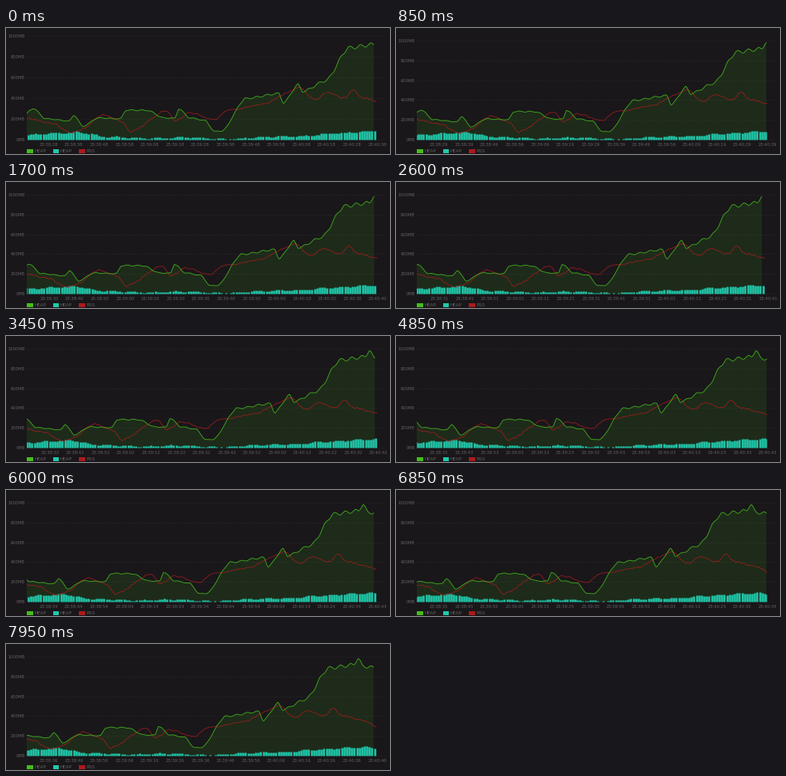
These frames come from a looping animation (480 by 158 pixels, 8 s). A matplotlib script:

```python
import numpy as np
import matplotlib.pyplot as plt
from matplotlib.animation import FuncAnimation
from matplotlib.collections import LineCollection
from matplotlib.patches import Polygon, Rectangle

W, H, DPI = 480, 158, 100
FRAMES, STEP = 160, 50
PX = 72 / DPI
SPEED = 3.16               # pixels per second, one sample per second
LEFT, RIGHT, BASE, END = 26, 463.5, 140, 459.5
BG, DIM = "#19171a", "#626063"
GREEN, TEAL, RED = "#45bd1c", "#20c9ac", "#ac1a1c"

# Turning points: position along the strip, megabytes
HEAP = [(20, 215), (34, 303), (49, 203), (79, 180), (85, 237), (96, 128),
        (115, 210), (143, 202), (150, 285), (177, 283), (197, 210), (211, 207),
        (216, 300), (229, 212), (249, 185), (260, 82), (270, 82), (299, 396),
        (341, 445), (347, 355), (365, 530), (371, 465), (400, 570), (428, 885),
        (459, 918), (465, 985), (471, 906), (492, 880)]
RSS = [(20, 215), (60, 150), (80, 65), (93, 90), (121, 238), (145, 176),
       (156, 74), (200, 280), (211, 180), (231, 262), (260, 190), (277, 285),
       (318, 335), (367, 500), (387, 380), (401, 455), (425, 396), (433, 486),
       (445, 405), (476, 342), (492, 268)]
BARS = [(20, 45), (60, 64), (90, 75), (125, 30), (180, 14), (222, 24),
        (275, 8), (335, 33), (375, 38), (405, 62), (475, 90), (492, 66)]


def ease_through(points, u):
    """Join the points with a blend of straight and smoothstep segments."""
    x, y = np.array(points, float).T
    i = np.clip(np.searchsorted(x, u, side="right") - 1, 0, len(x) - 2)
    k = np.clip((u - x[i]) / (x[i + 1] - x[i]), 0, 1)
    k = 0.35 * k + 0.65 * k * k * (3 - 2 * k)
    return y[i] + (y[i + 1] - y[i]) * k


def ripple(u, crest, period):
    return np.cos(2 * np.pi * (u - crest) / period)


rng = np.random.default_rng(4)
fine = np.arange(20, 495, 0.5)
samples = END + SPEED * np.arange(-142, 12)
heap = ease_through(HEAP, fine) * (1 + 0.018 * ripple(fine, 365, 13))
rss = ease_through(RSS, samples) + rng.uniform(-9, 9, samples.size)
load = ease_through(BARS, samples) + 6 * ripple(samples, 215, 26)
load = np.maximum(load + rng.uniform(-2, 2, samples.size), 2)

fig = plt.figure(figsize=(W / DPI, H / DPI), dpi=DPI, facecolor=BG)
ax = fig.add_axes([0, 0, 1, 1])
ax.set_xlim(0, W)
ax.set_ylim(H, 0)
ax.axis("off")

plot_area = Rectangle((LEFT, 0), RIGHT - LEFT, BASE + 0.5, transform=ax.transData)


def label(x, y, text, size=5.3, ha="center"):
    return ax.text(x, y, text, color=DIM, fontsize=size * PX, ha=ha,
                   va="center_baseline", family="DejaVu Sans")


def clipped(artist):
    artist.set_clip_path(plot_area)
    return artist


def curve(color, width, z):
    return clipped(ax.plot([], [], color=color, lw=width * PX, alpha=0.82, zorder=z)[0])


grid, y_labels = [], []
for mb in range(0, 1001, 200):
    grid.append(ax.plot([LEFT, 475], [0, 0], color="#2b292c", lw=0.8 * PX,
                        ls=(0, (1.5, 2)), zorder=1)[0])
    y_labels.append(label(23.5, 0, f"{mb}MB", 5.1, "right"))
x_labels = [label(0, 146, "") for _ in range(14)]

area = clipped(ax.add_patch(Polygon([(0, 0), (1, 0), (1, 1)], fc=GREEN, ec="none",
                                    alpha=0.12, zorder=2)))
bars = clipped(ax.add_collection(LineCollection([], colors=TEAL, linewidths=2.6 * PX,
                                                capstyle="butt", zorder=3)))
rss_line = curve(RED, 0.9, 4)
heap_line = curve(GREEN, 0.95, 5)

for x, name, color in ((26, "HEAP", GREEN), (58.5, "HEAP", TEAL), (91, "RSS", RED)):
    ax.add_patch(Rectangle((x, 151.5), 7.5, 5.5, fc=color, ec="none"))
    label(x + 9.3, 154.3, name, 5.6, "left")


def clock(seconds):
    m, s = divmod(seconds, 60)
    h, m = divmod(m, 60)
    return f"{h:02d}:{m:02d}:{s:02d}"


def update(frame):
    ms = frame * STEP
    t = ms / 1000
    shift = SPEED * t
    batches = (ms + 1150) // 2000          # two samples arrive every 2 s
    scale = 0.130 if batches == 0 else 0.124
    end = END + SPEED * 2 * batches + 0.1

    for i, (line, text) in enumerate(zip(grid, y_labels)):
        y = BASE - 200 * i * scale
        line.set_ydata([y, y])
        text.set_y(y)

    tick = (ms + 750) // 1000
    for i, text in enumerate(x_labels):
        text.set_x(53.2 + SPEED * (10 * i + tick - t))
        text.set_text(clock(23 * 3600 + 38 * 60 + 28 + tick + 10 * i))

    keep = fine <= end
    x, y = fine[keep] - shift, BASE - heap[keep] * scale
    heap_line.set_data(x, y)
    area.set_xy(np.column_stack([np.r_[x, x[-1], x[0]], np.r_[y, BASE, BASE]]))

    keep = samples <= end + SPEED
    rss_line.set_data(samples[keep] - shift, BASE - rss[keep] * scale)

    keep = samples <= end
    bars.set_segments([[(x, BASE), (x, BASE - v * scale)] for x, v in
                       zip(samples[keep] - shift + 1, load[keep])])
    return [area, bars, rss_line, heap_line, *grid, *y_labels, *x_labels]


anim = FuncAnimation(fig, update, frames=FRAMES, interval=STEP, repeat=True,
                     repeat_delay=0, blit=False)
plt.show()
```
